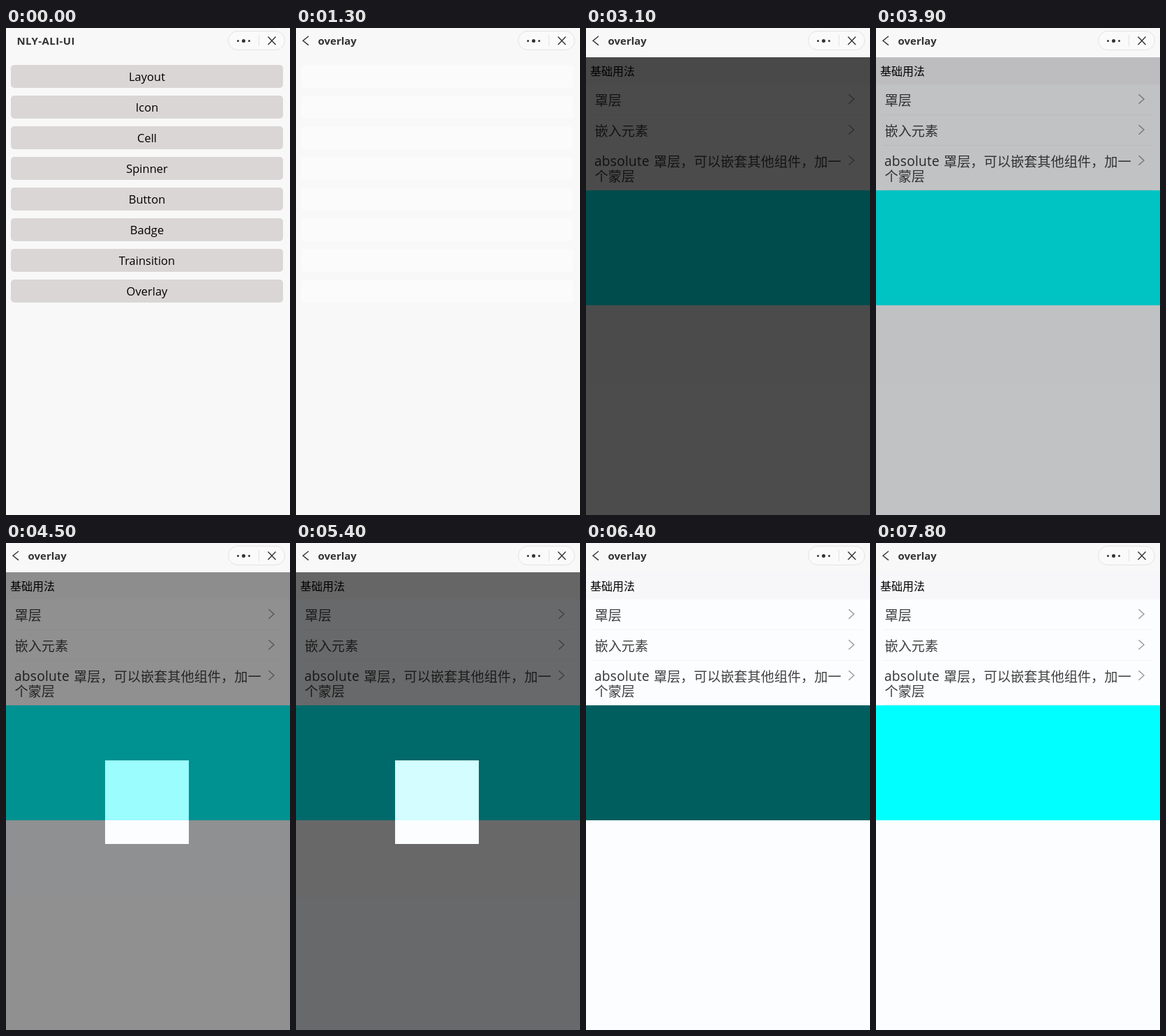
An HTML page for the animation above (8.9 s loop, 407 by 699 pixels).

```html
<!DOCTYPE html>
<html lang="zh-CN">
<head>
<meta charset="utf-8">
<title>overlay</title>
<style>
  html, body { margin: 0; width: 100%; height: 100%; overflow: hidden; background: #f8f8f8; }
  svg { display: block; width: 407px; height: 699px; }
  text { font-family: "Open Sans", "Noto Sans CJK SC", "Noto Sans CJK", sans-serif; white-space: pre; }
  .title { font-size: 15px; font-weight: 700; fill: #333; }
  .label { font-size: 16.5px; text-anchor: middle; fill: #000; }
  .cell { font-size: 19.2px; fill: #333; }
  .zh { font-family: "Noto Sans CJK SC", "Noto Sans CJK", sans-serif; }
  .cell.zh { fill: #404040; }
  .line { fill: none; stroke: #333; stroke-width: 1.4; }
</style>
</head>
<body>
<svg viewBox="0 0 407 699" xmlns="http://www.w3.org/2000/svg">
  <rect width="407" height="699" fill="#f8f8f8"/>

  <g id="menu">
    <text class="title" x="15.5" y="24" letter-spacing=".4">NLY-ALI-UI</text>
  </g>
  <g id="ghost" fill="#fbfbfb"></g>

  <g id="page">
    <rect y="42" width="407" height="39" fill="#f7f7f9"/>
    <rect y="81" width="407" height="618" fill="#fcfdff"/>
    <text class="zh" x="6" y="68" font-size="16">基础用法</text>
    <text class="cell zh" x="12.5" y="110.5">罩层</text>
    <text class="cell zh" x="12.5" y="154.5">嵌入元素</text>
    <text class="cell" x="12" y="198" letter-spacing=".2">absolute</text>
    <text class="cell zh" x="97" y="198.5">罩层&#xFF0C;可以嵌套其他组件&#xFF0C;加一</text>
    <text class="cell zh" x="12.5" y="219.5">个蒙层</text>
    <g id="cells"></g>
    <rect y="233" width="407" height="165" fill="#0ff"/>
    <rect id="inner" y="233" width="407" height="165" fill-opacity=".7"/>
  </g>

  <g id="mask">
    <rect y="42" width="407" height="657" fill-opacity=".7"/>
    <rect id="block" x="142" y="312" width="120" height="120" fill="#fdfdff"/>
  </g>

  <g id="nav">
    <path class="line" d="M18 11.8L10 18.2L18 24.6"/>
    <text class="title" x="31.5" y="24">overlay</text>
  </g>

  <rect x="318.5" y="4.5" width="81" height="27" rx="13.5" fill="#fafafa" stroke="#e3e3e3"/>
  <g fill="#333">
    <circle cx="332.5" cy="18.5" r="1.5"/>
    <circle cx="340.5" cy="18.5" r="2.5"/>
    <circle cx="348.5" cy="18.5" r="1.5"/>
  </g>
  <path d="M362.5 10V26" stroke="#e3e3e3"/>
  <path class="line" d="M375.5 12.5L386.5 24M386.5 12.5L375.5 24"/>
</svg>
<script>
  const LOOP = 8900, TICK = 100, FADE = 300;
  const $ = id => document.getElementById(id);

  function add(parent, tag, attrs, text) {
    const el = document.createElementNS("http://www.w3.org/2000/svg", tag);
    for (const k in attrs) el.setAttribute(k, attrs[k]);
    if (text) el.textContent = text;
    parent.appendChild(el);
  }

  ["Layout", "Icon", "Cell", "Spinner", "Button", "Badge", "Trainsition", "Overlay"].forEach((name, i) => {
    const box = { x: 7, y: 53 + 44 * i, width: 390, height: 33, rx: 5 };
    add($("ghost"), "rect", box);
    add($("menu"), "rect", { ...box, fill: "#dad6d5" });
    add($("menu"), "text", { class: "label", x: 202, y: 76 + 44 * i }, name);
  });

  [102, 146, 190].forEach(y =>
    add($("cells"), "path", { d: `M376.5 ${y - 6.7}L384 ${y}L376.5 ${y + 6.7}`, fill: "none", stroke: "#999", "stroke-width": 1.4 }));
  [124, 168, 232].forEach(y =>
    add($("cells"), "rect", { x: 9, y, width: 388, height: 1, fill: "#f3f3f4" }));

  const ramp = (t, start) => Math.min(1, Math.max(0, (t - start) / FADE));
  const pulse = (t, show, hide) => ramp(t, show) - ramp(t, hide);
  const alpha = (id, v) => $(id).setAttribute("opacity", v);

  function draw(ms) {
    const t = Math.floor((ms % LOOP) / TICK) * TICK;
    const onMenu = t < 1300;
    const plain = pulse(t, 2800, 3700);
    const embed = pulse(t, 4315, 5350);
    alpha("menu", onMenu ? 1 : 0);
    alpha("nav", onMenu ? 0 : 1);
    alpha("ghost", onMenu ? 0 : 1);
    alpha("page", ramp(t, 1500));
    alpha("mask", Math.max(plain, embed));
    alpha("block", embed > 0 ? 1 : 0);
    alpha("inner", pulse(t, 6130, 7500));
  }

  const begin = performance.now();
  function loop() {
    draw(performance.now() - begin);
    requestAnimationFrame(loop);
  }
  draw(0);
  requestAnimationFrame(loop);
</script>
</body>
</html>
```
